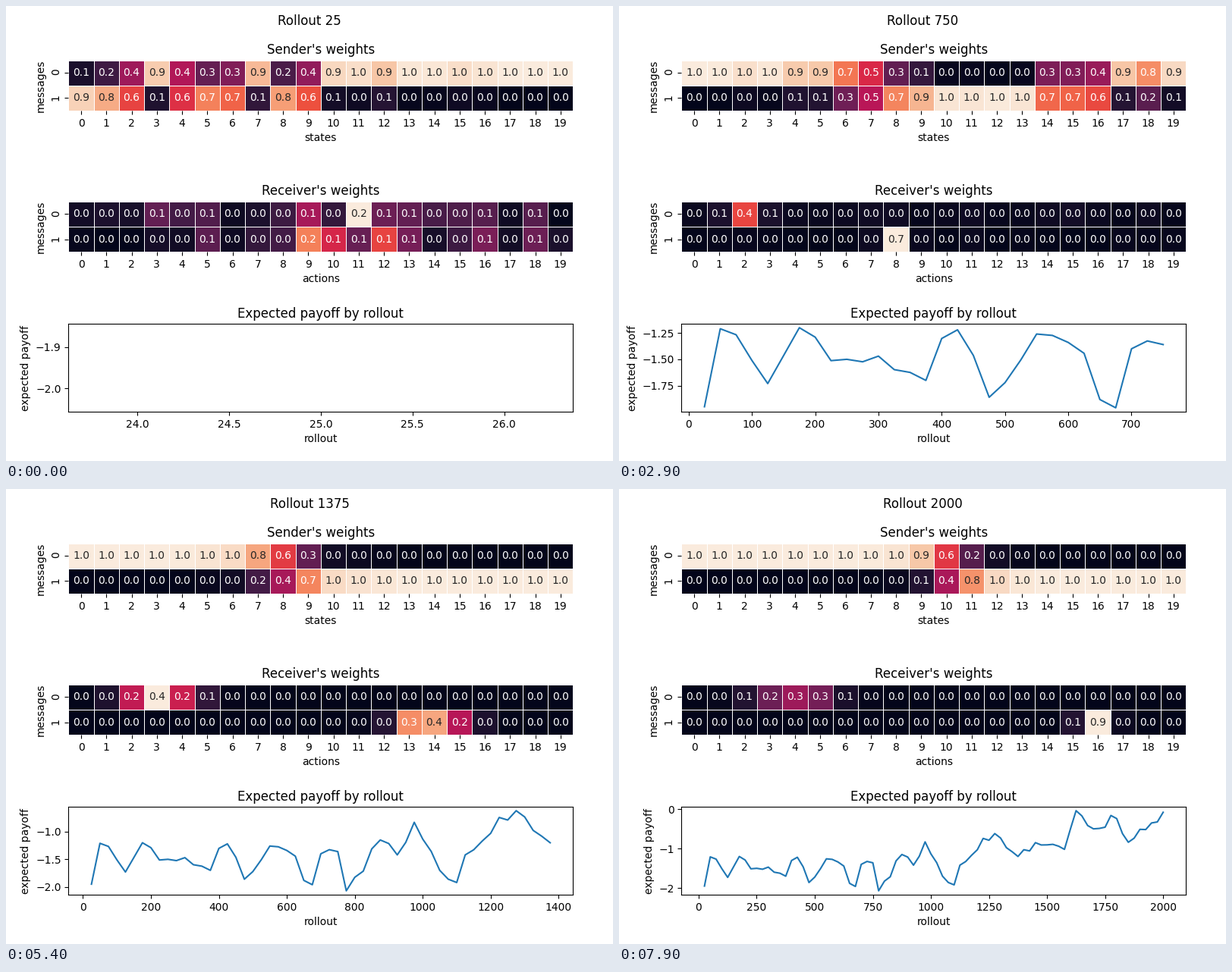
Write a matplotlib script that moves like this. It is 800x600 px and loops after 8000 ms.

```python
import numpy as np
import matplotlib.pyplot as plt
from matplotlib.animation import FuncAnimation
from matplotlib.colors import LinearSegmentedColormap, Normalize

WIDTH, HEIGHT, DPI = 800, 600, 100
STEP, FRAMES = 25, 80
LAST = STEP * FRAMES
N = 20
CELLS = np.arange(N)

CMAP = LinearSegmentedColormap.from_list("ember", [
    "#03051a", "#221331", "#451c47", "#691f55", "#921c5b", "#b91657",
    "#d92847", "#ed503e", "#f47d57", "#f6a47c", "#f7c9aa", "#faebdd"])

# Learning path: rollout; band of states sending message 1 (low, high);
# receiver's peak (centre, width) for message 0 and for message 1.
PATH = np.array([
    (25, -5, 4.5, 9, 4.5, 12, 5),
    (325, 5.5, 15.5, 14, 1.8, 10, 1.5),
    (750, 6.7, 16.6, 2, .4, 8, .35),
    (1025, 11.8, 25, 11.5, 1.8, 11.7, .9),
    (1375, 8.2, 28, 3, .9, 13.9, 1),
    (1625, 8.8, 30, 5.4, .8, 12.3, .5),
    (2000, 10.3, 30, 3.9, 1.1, 15.9, .4)])

# Main turning points of the payoff curve: (step, payoff).
TURNS = [
    (1, -1.95), (2, -1.21), (5, -1.73), (7, -1.2), (10, -1.5), (15, -1.7),
    (17, -1.22), (19, -1.86), (22, -1.26), (24, -1.34), (27, -1.96), (28, -1.4),
    (30, -1.36), (31, -2.07), (35, -1.15), (37, -1.42), (39, -.83), (42, -1.7),
    (44, -1.92), (45, -1.42), (51, -.62), (55, -1.2), (58, -.85), (63, -1.02),
    (65, -.04), (68, -.5), (72, -.24), (74, -.84), (80, -.08)]


def payoff_curve():
    turns, values = zip(*TURNS)
    steps = np.arange(1, FRAMES + 1)
    jitter = np.random.default_rng(4).normal(0, .07, FRAMES)
    jitter[np.array(turns) - 1] = 0
    return STEP * steps, np.interp(steps, turns, values) + jitter


def weights_at(rollout):
    """Sender and receiver weights: noisy at first, then sharper."""
    rng = np.random.default_rng(rollout)
    progress = rollout / LAST
    unrest = np.exp(-2.2 * progress)
    low, high, *peaks = [np.interp(rollout, PATH[:, 0], column)
                         for column in PATH[:, 1:].T]

    logits = (.45 + 1.2 * progress) * np.minimum(CELLS - low, high - CELLS)
    logits += rng.normal(0, 1.4 * unrest, N)
    second = 1 / (1 + np.exp(-logits))
    sender = np.array([1 - second, second])

    centre, width = np.reshape(peaks, (2, 2, 1)).swapaxes(0, 1)
    receiver = np.exp(-((CELLS - centre) / width) ** 2 / 2)
    receiver += .12 * (1 - progress) ** 3 + .002
    receiver *= np.exp(rng.normal(0, .8 * unrest, (2, N)))
    return sender, receiver / receiver.sum(axis=1, keepdims=True)


def luminance(rgb):
    rgb = np.where(rgb <= .03928, rgb / 12.92, ((rgb + .055) / 1.055) ** 2.4)
    return rgb @ [.2126, .7152, .0722]


def add_axes(top, height, title, xlabel, ylabel):
    ax = fig.add_axes([82.4 / WIDTH, 1 - (top + height) / HEIGHT,
                       665 / WIDTH, height / HEIGHT])
    ax.set(title=title, xlabel=xlabel, ylabel=ylabel)
    return ax


class Heatmap:
    def __init__(self, top, title, xlabel):
        ax = add_axes(top, 66.5, title, xlabel, "messages")
        self.mesh = ax.pcolormesh(np.zeros((2, N)), cmap=CMAP,
                                  edgecolor="white", linewidth=.5)
        ax.set(xlim=(0, N), ylim=(2, 0))
        ax.set_xticks(CELLS + .5, CELLS)
        ax.set_yticks([.5, 1.5], [0, 1], rotation="vertical")
        ax.spines[:].set_visible(False)
        self.labels = [ax.text(c + .5, r + .5, "", ha="center", va="center")
                       for r in range(2) for c in range(N)]

    def show(self, weights):
        norm = Normalize(weights.min(), weights.max())
        self.mesh.set_array(weights)
        self.mesh.set_norm(norm)
        for label, value in zip(self.labels, weights.flat):
            light = luminance(np.array(CMAP(norm(value))[:3])) > .408
            label.set_text(f"{value:.1f}")
            label.set_color(".15" if light else "w")


fig = plt.figure(figsize=(WIDTH / DPI, HEIGHT / DPI), dpi=DPI)
heading = fig.suptitle("", y=1 - 11 / HEIGHT)
sender_map = Heatmap(71.58, "Sender's weights", "states")
receiver_map = Heatmap(257.68, "Receiver's weights", "actions")
payoff_ax = add_axes(418.93, 116.2, "Expected payoff by rollout", "rollout",
                     "expected payoff")
payoff_line, = payoff_ax.plot([], [])
rollouts, payoffs = payoff_curve()


def update(frame):
    heading.set_text(f"Rollout {rollouts[frame]}")
    sender, receiver = weights_at(rollouts[frame])
    sender_map.show(sender)
    receiver_map.show(receiver)
    payoff_line.set_data(rollouts[:frame + 1], payoffs[:frame + 1])
    payoff_ax.relim()
    payoff_ax.autoscale_view()


anim = FuncAnimation(fig, update, frames=FRAMES, interval=100,
                     init_func=lambda: update(0), repeat=True, repeat_delay=0)
plt.show()
```
